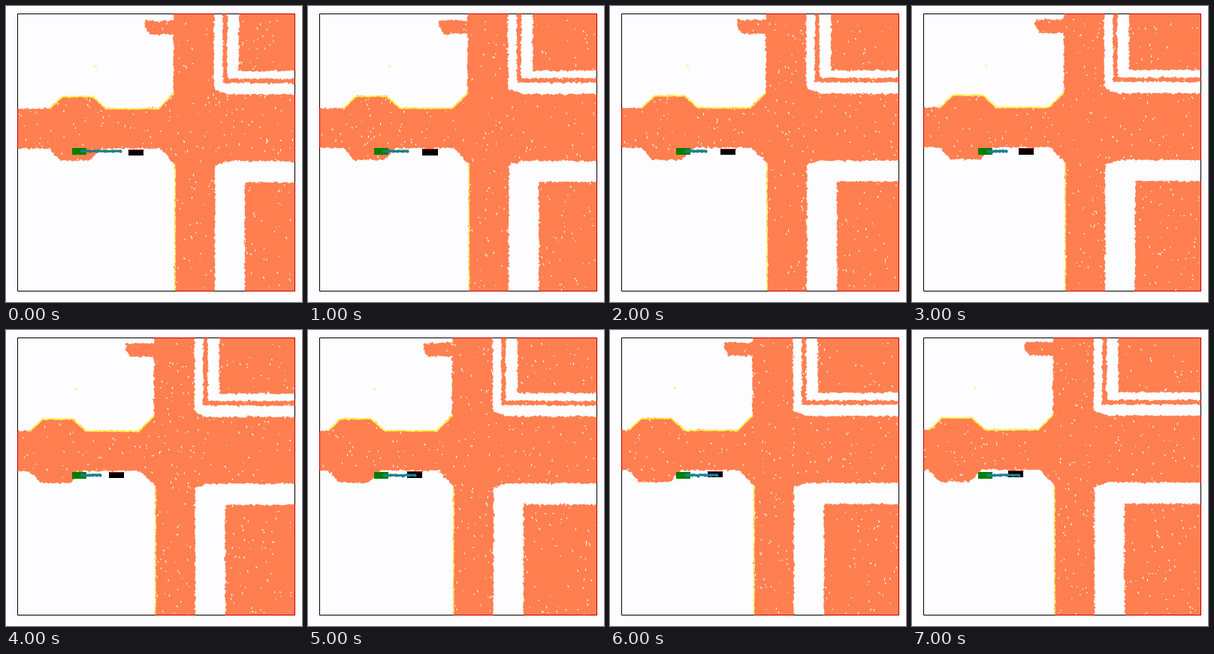
A matplotlib script for the animation above (8 s loop, 394 px wide and 394 px high).

```python
import numpy as np
import matplotlib.pyplot as plt
from matplotlib.animation import FuncAnimation
from matplotlib.collections import LineCollection
from matplotlib.patches import Polygon, Rectangle

SIZE = 394
PX = 0.72  # one pixel in points at 100 dpi
FRAMES = 8
PAPER = "#fdfdff"
CORAL = "#ff7f50"
YELLOW = "#fff03c"
LEFT, TOP, SIDE = 15.2, 10.2, 369  # map window

CURB = [(58, 137), (75, 121), (115, 121), (133, 137), (203, 137), (223, 117)]
VERGE = [(225, 400), (225, 211)]
ROAD = [(0, 137)] + CURB + [
    (223, 38), (191, 38), (185, 29), (185, 20), (223, 20), (223, 0),
    (277, 0), (277, 111), (296, 118), (450, 118), (450, 207), (296, 207),
    (278, 213), (278, 400)] + VERGE + [
    (205, 190), (128, 190), (112, 206), (72, 206), (58, 190), (0, 190)]
LANE = [(288.5, -5), (294.5, -5), (294.5, 97), (450, 97), (450, 103),
        (288.5, 103)]


def corners(left, top, right, bottom):
    return [(left, top), (right, top), (right, bottom), (left, bottom)]


LAND = [ROAD, LANE, corners(310, -5, 450, 87), corners(318, 235, 450, 400)]

fig = plt.figure(figsize=(SIZE / 100, SIZE / 100), dpi=100, facecolor=PAPER)
ax = fig.add_axes([0, 0, 1, 1])
clip = Rectangle((LEFT, TOP), SIDE, SIDE, transform=ax.transData)


def drift(t):
    """Scene offset seen from the green car, which brakes in two stages."""
    return np.array([-np.interp(t, [0, 1, 5, 7], [0, 10.7, 31.2, 35.2]),
                     -0.4 - 0.5 * t])


def rough(points, rng, closed=True, amount=0.8, step=1.8):
    """Resample an outline and jitter it."""
    pts = np.array(points, float)
    if closed:
        pts = np.vstack([pts, pts[:1]])
    out = []
    for a, b in zip(pts[:-1], pts[1:]):
        n = max(2, int(np.hypot(*(b - a)) / step))
        out.append(a + (b - a) * np.arange(n)[:, None] / n)
    out = np.vstack(out + [pts[-1:]])
    return out + rng.normal(0, amount, out.shape)


def stroke(points, color, width, **kw):
    line, = ax.plot(*np.array(points, float).T, color=color, lw=width * PX,
                    **kw)
    line.set_clip_path(clip)


def frame_box(color, zorder):
    return ax.add_patch(Rectangle((LEFT, TOP), SIDE, SIDE, fill=False,
                                  ec=color, lw=PX, zorder=zorder))


def draw_land(shift, rng):
    frame_box("black", 8)
    for shape in LAND:
        patch = ax.add_patch(Polygon(rough(shape, rng) + shift, fc=CORAL,
                                     lw=0, zorder=1))
        # The border turns red where land touches it
        frame_box("#c00000", 9).set_clip_path(patch)
        patch.set_clip_path(clip)
    stroke(rough(CURB, rng, False, 0.4) + shift, YELLOW, 1.8, zorder=2)
    stroke(rough(VERGE, rng, False, 0.4) + shift, YELLOW, 1.1, zorder=2)
    ax.plot(*(np.array([119, 80.8]) + shift), "o", ms=3 * PX, mew=0,
            color="#fff080", zorder=2)


def draw_specks(rng, count=620):
    start = rng.uniform(17, 382, (count, 2))
    dash = rng.choice([-1, 0, 1, 1.8], (count, 2)) + [0, 0.9]
    ax.add_collection(LineCollection(np.stack([start, start + dash], 1),
                                     colors=PAPER, linewidths=1.2 * PX,
                                     zorder=1.5))


def draw_cars(shift):
    x, y = np.array([163, 191.2]) + shift
    ax.add_patch(Rectangle((x, y), 20.3, 8.2, fc="black", lw=0, zorder=4))
    stroke([(x, y), (x + 20.3, y)], "#c00808", 1, zorder=4,
           solid_capstyle="butt")
    ax.add_patch(Rectangle((88, 189.2), 19, 8.6, fc="#008000", lw=0,
                           zorder=5))


def draw_plan(t, rng):
    """Planned path: shrinks while braking, then reaches the black car."""
    reach = 41 if t >= 5 else 24 + 27 * np.exp(-1.4 * t)
    color = (0.1, 0.5, 0.5 + 0.015 * t)
    x = np.linspace(101, 101 + reach, 16)
    y = 193.2 + rng.normal(0, 0.25, x.size)
    stroke(np.column_stack([x, y]), color, 3.2, zorder=6,
           solid_capstyle="round")
    ax.plot(x[::3], y[::3], "o", ms=4.2 * PX, mew=0, color=color, zorder=6)


def draw(t):
    ax.clear()
    ax.set(xlim=(0, SIZE), ylim=(SIZE, 0))
    ax.axis("off")
    rng = np.random.default_rng(40 + t)
    shift = drift(t)
    draw_land(shift, rng)
    draw_specks(rng)
    draw_cars(shift)
    draw_plan(t, rng)
    return []


anim = FuncAnimation(fig, draw, frames=FRAMES, interval=1000, repeat=True,
                     init_func=lambda: [])
plt.show()
```
